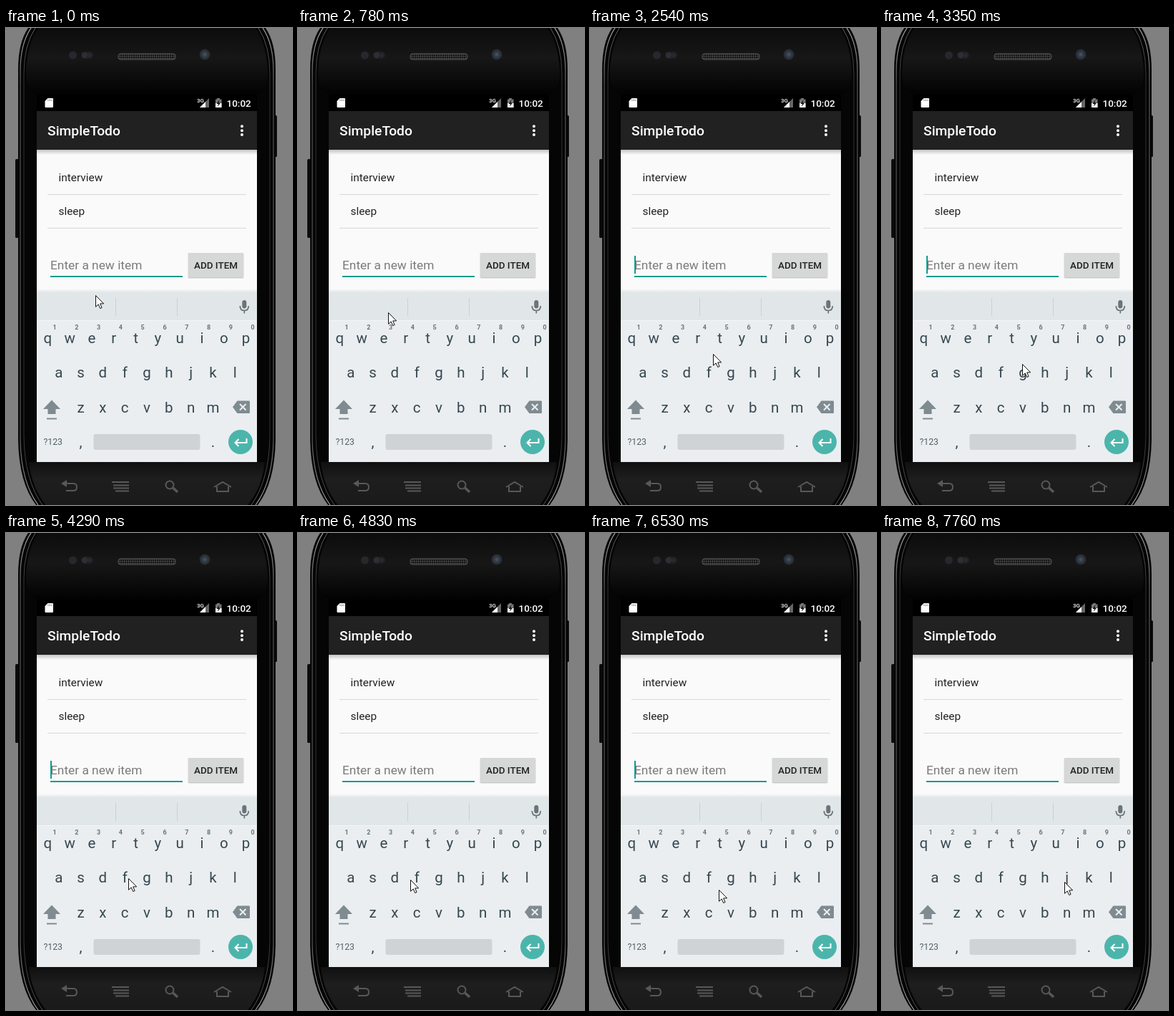
An HTML page for the animation above (8000 ms loop, 400 by 666 pixels).

```html
<!DOCTYPE html>
<html lang="en">
<head>
<meta charset="utf-8">
<title>Todo app on a phone</title>
<style>
  html, body { margin: 0; width: 100%; height: 100%; overflow: hidden; background: #808080; }
  svg { display: block; width: 400px; height: 666px; }
  text { font-family: Roboto, "Noto Sans", sans-serif; }
  .medium { font-weight: 500; }
  .key { font-size: 20.5px; fill: #37474f; text-anchor: middle; }
  .hint { font-size: 9px; font-weight: 700; fill: #6b7479; text-anchor: middle; }
</style>
</head>
<body>
<svg viewBox="0 0 400 666" xmlns="http://www.w3.org/2000/svg">
  <defs>
    <linearGradient id="top" x2="0" y2="1">
      <stop stop-color="#0c0c0c"/><stop offset=".45" stop-color="#171717"/><stop offset="1" stop-color="#020202"/>
    </linearGradient>
    <linearGradient id="chin" x2="0" y2="1">
      <stop stop-color="#101010"/><stop offset=".4" stop-color="#1e1e1e"/><stop offset="1" stop-color="#1a1a1a"/>
    </linearGradient>
    <linearGradient id="rim" gradientUnits="userSpaceOnUse" x1="0" y1="0" x2="0" y2="666">
      <stop stop-color="#aaa"/><stop offset=".12" stop-color="#555"/>
      <stop offset=".85" stop-color="#555"/><stop offset="1" stop-color="#999"/>
    </linearGradient>
    <linearGradient id="shade" x2="0" y2="1">
      <stop stop-color="#000" stop-opacity=".22"/><stop offset="1" stop-color="#000" stop-opacity="0"/>
    </linearGradient>
    <linearGradient id="lift" x2="0" y2="1">
      <stop stop-color="#dfe4e7" stop-opacity="0"/><stop offset="1" stop-color="#dfe4e7"/>
    </linearGradient>
    <radialGradient id="lens">
      <stop stop-color="#4a5765"/><stop offset=".5" stop-color="#303a44"/><stop offset="1" stop-color="#24282d"/>
    </radialGradient>
    <pattern id="mesh" width="3" height="3" patternUnits="userSpaceOnUse">
      <path d="M0 0H3M0 0V3" stroke="#5a5a5a"/>
    </pattern>
  </defs>

  <rect width="400" height="666" fill="#808080"/>
  <g id="phone">
    <rect x="13" y="183" width="6" height="110" rx="1.5" fill="#0b0b0b"/>
    <rect x="374" y="122" width="5" height="58" rx="1.5" fill="#0b0b0b"/>
    <path d="M31 0Q17 20 17 58V575Q18 635 42 666H352Q376 635 377 575V58Q377 20 363 0Z" fill="#050505"/>
    <g fill="none" stroke="url(#rim)">
      <path d="M35 0Q20 22 20 60V575Q21 634 45 666M359 0Q374 22 374 60V575Q373 634 349 666" stroke-width="1.2"/>
      <path d="M41 0Q25 24 25 64V570Q26 632 51 666M353 0Q369 24 369 64V570Q368 632 343 666" opacity=".55"/>
    </g>
    <path d="M45 0Q28 26 28 66Q30 93 50 93H344Q364 93 366 66Q366 26 349 0Z" fill="url(#top)"/>
    <path d="M32 606H362Q358 642 338 666H56Q36 642 32 606Z" fill="url(#chin)"/>
    <circle cx="93.500" cy="38" r="5.500" fill="#29272d"/>
    <rect x="105" y="33" width="17" height="10" rx="5" fill="#201f23"/>
    <circle cx="110" cy="38" r="4" fill="#302d34"/>
    <circle cx="117" cy="38" r="3" fill="#2a282e"/>
    <rect x="156" y="35.500" width="82" height="9" rx="3.500" fill="#151515"/>
    <rect x="157" y="36" width="80" height="8" rx="3" fill="url(#mesh)" stroke="#5a5a5a"/>
    <circle cx="278" cy="37" r="7.500" fill="url(#lens)"/>
    <g fill="none" stroke="#585858" stroke-width="2">
      <path d="M83 636H94Q99 636 99 641T94 646H84"/>
      <path d="M148 634H172M150 638.500H172M150 642.500H172M153 646.500H172"/>
      <circle cx="229" cy="638" r="5.500"/>
      <path d="M233.500 642L240 648" stroke-width="3.500"/>
      <path d="M291 641L303 634L315 641M295 640V647H311V640"/>
    </g>
    <path d="M77 636L85 631V641Z" fill="#585858"/>
  </g>

  <g id="status">
    <rect x="43" y="93" width="308" height="23"/>
    <path d="M58.500 98H65Q66 98 66 99V110Q66 111 65 111H55.500Q54.500 111 54.500 110V102Z" fill="#fff"/>
    <path d="M59 99.500V102M61.500 99.500V102M64 99.500V102" stroke="#777"/>
    <text class="medium" x="267" y="104" font-size="8" fill="#fff">3G</text>
    <path d="M271 111L284 98V111Z" fill="#666"/>
    <path d="M271 111L279 103V111Z" fill="#fff"/>
    <path d="M293 99.500H295V98H299V99.500H301.500V111H293Z" fill="#777"/>
    <path d="M293 105H301.500V111H293Z" fill="#fff"/>
    <path d="M298.500 100L294.500 106H297L296 110L300 104.500H297.500Z" fill="#111"/>
    <text class="medium" x="308.500" y="110" font-size="13.500" fill="#fff">10:02</text>
  </g>

  <g id="app">
    <rect x="43" y="116" width="308" height="490" fill="#fafafa"/>
    <rect x="43" y="170" width="308" height="7" fill="url(#shade)"/>
    <rect x="43" y="116" width="308" height="54" fill="#212121"/>
    <text class="medium" x="58" y="150" font-size="19.250" fill="#fff">SimpleTodo</text>
    <g fill="#fff">
      <circle cx="330" cy="137.300" r="2"/><circle cx="330" cy="143.200" r="2"/><circle cx="330" cy="149.100" r="2"/>
    </g>
    <g font-size="15.400" fill="#212121">
      <text x="73.500" y="214">interview</text>
      <text x="73.500" y="261">sleep</text>
    </g>
    <path d="M58 232.500H336M58 279.500H336" stroke="#d8d8d8"/>
    <text x="62" y="337" font-size="17.325" fill="#7b7b7b">Enter a new item</text>
    <rect x="62" y="346" width="185" height="2" fill="#119a8d"/>
    <rect id="caret" x="62" y="318" width="2" height="25" fill="#119a8d"/>
    <rect x="254" y="314" width="79" height="36" rx="2" opacity=".08"/>
    <rect x="255" y="314" width="77" height="35" rx="2" opacity=".13"/>
    <rect x="255" y="314" width="77" height="34" rx="2" fill="#d6d7d7"/>
    <text class="medium" x="293.500" y="336" font-size="13.475" fill="#212121" text-anchor="middle">ADD ITEM</text>
  </g>

  <g id="keyboard">
    <rect x="43" y="364" width="308" height="6" fill="url(#lift)"/>
    <rect x="43" y="370" width="308" height="38" fill="#e1e6e9"/>
    <rect x="43" y="408" width="308" height="198" fill="#eaeef1"/>
    <path d="M43 408.500H351" stroke="#f4f6f7"/>
    <path d="M153.500 377V402M239.500 377V402" stroke="#cbd0d3"/>
    <rect x="330.300" y="380" width="6" height="11.500" rx="3" fill="#6a7479"/>
    <path d="M327.300 388Q327.300 394.500 333.300 394.500T339.300 388M333.300 394.500V398.500" fill="none" stroke="#6a7479" stroke-width="1.700"/>
    <g id="keys"></g>
    <path d="M64 519.500L76 532H69.500V539H58.500V532H52Z" fill="#7f8b90"/>
    <path d="M57 545.500H71" stroke="#7f8b90" stroke-width="2"/>
    <path d="M323.500 520.500H340Q341 520.500 341 521.500V537Q341 538 340 538H323.500L317 529.250Z" fill="#7f8b90"/>
    <path d="M327 525L335.500 533.500M335.500 525L327 533.500" stroke="#eaeef1" stroke-width="2"/>
    <text x="65.700" y="582" font-size="12.300" fill="#536066" text-anchor="middle">?123</text>
    <rect x="122.500" y="567" width="149" height="22" rx="3" fill="#cfd3d6"/>
    <circle cx="328" cy="578" r="17" fill="#4cb5ab"/>
    <path d="M336.500 573V579H321M325.500 574L320.500 579L325.500 584" fill="none" stroke="#fff" stroke-width="2"/>
  </g>

  <path id="pointer" d="M.5 .5V16.300L4.200 12.900L6.700 18.500L9.100 17.500L6.700 11.900H11.700Z" fill="#fff" stroke="#111" stroke-linejoin="round"/>
</svg>
<script>
const LOOP = 8000;
const PITCH = 30.8;
const el = id => document.getElementById(id);

function addText(content, x, y, className) {
  const node = document.createElementNS("http://www.w3.org/2000/svg", "text");
  node.setAttribute("x", x);
  node.setAttribute("y", y);
  node.setAttribute("class", className);
  node.textContent = content;
  el("keys").append(node);
}

function addRow(letters, x, y, className = "key") {
  [...letters].forEach((letter, i) => addText(letter, x + i * PITCH, y, className));
}

addRow("qwertyuiop", 58.4, 440);
addRow("asdfghjkl", 73.8, 488);
addRow("zxcvbnm", 104.6, 537);
addRow(",", 104.6, 585);
addRow(".", 289.4, 585);
addRow("1234567890", 68, 421, "hint");

// The screen refreshes in bursts: [first, last, count], in ms.
const bursts = [
  [0, 930, 8], [1200, 1600, 4], [1720, 2270, 5], [2540, 3350, 7],
  [3630, 4290, 6], [4420, 4540, 2], [4680, 4980, 3], [5250, 5250, 1],
  [5530, 5680, 2], [5960, 6530, 5], [6680, 6830, 2], [7100, 7760, 6]
];
const ticks = bursts.flatMap(([first, last, count]) =>
  Array.from({ length: count }, (_, i) =>
    first + (last - first) * i / Math.max(1, count - 1)));

// Pointer waypoints: [time, x, y].
const route = [
  [0, 125, 373], [930, 126, 407], [1200, 135, 402], [1600, 146, 390],
  [2140, 162, 442], [2270, 163, 444], [2540, 172, 455], [3350, 196, 469],
  [3630, 218, 474], [3890, 246, 480], [4290, 171, 482], [4540, 175, 483],
  [4980, 148, 484], [5680, 148, 484], [6100, 155, 507], [6530, 180, 498],
  [6830, 238, 488], [7360, 254, 489], [7760, 255, 487]
];

function pointerAt(time) {
  const next = route.findIndex(point => point[0] > time);
  if (next < 0) return route.at(-1).slice(1);
  const [t0, x0, y0] = route[next - 1];
  const [t1, x1, y1] = route[next];
  const k = (time - t0) / (t1 - t0);
  return [x0 + (x1 - x0) * k, y0 + (y1 - y0) * k].map(Math.round);
}

function caretVisible(time) {
  const phase = time % 1000;
  return phase >= 150 && phase < 640;
}

function draw(time) {
  const tick = ticks.findLast(t => t <= time);
  el("pointer").setAttribute("transform", `translate(${pointerAt(tick)})`);
  el("caret").setAttribute("visibility", caretVisible(tick) ? "visible" : "hidden");
}

const start = performance.now();
function loop() {
  draw((performance.now() - start) % LOOP);
  requestAnimationFrame(loop);
}
loop();
</script>
</body>
</html>
```
